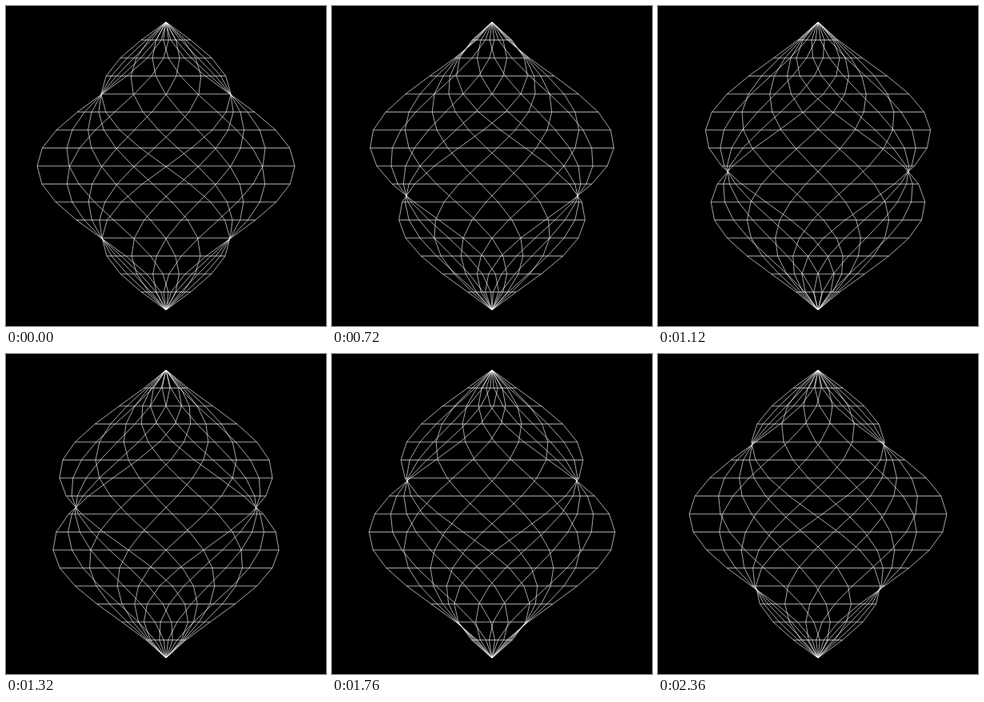
These frames come from a looping animation (400 px wide and 400 px high, 2400 ms). An HTML page with a canvas:

```html
<!DOCTYPE html>
<html lang="en">
<head>
<meta charset="utf-8">
<title>Twisting square lattice</title>
<style>
  html, body { margin: 0; height: 100%; overflow: hidden; background: #000; }
  canvas { display: block; }
</style>
</head>
<body>
<canvas id="stage" width="400" height="400"></canvas>
<script>
const ctx = document.getElementById('stage').getContext('2d');
const LOOP = 2400, STEP = 40, DELAY = 12;
const LEVELS = 16, SIDE = 4, RADIUS = 161, HEIGHT = 360, CENTER = 200;
const TWIST = Math.PI / LEVELS;

// Points along the perimeter of a square whose corners lie on the unit circle.
const perimeter = [];
for (let corner = 0; corner < 4; corner++) {
  const a = corner * Math.PI / 2, b = a + Math.PI / 2;
  for (let i = 0; i < SIDE; i++) {
    const f = i / SIDE;
    const x = Math.cos(a) * (1 - f) + Math.cos(b) * f;
    const z = Math.sin(a) * (1 - f) + Math.sin(b) * f;
    perimeter.push({ r: Math.hypot(x, z), angle: Math.atan2(z, x) });
  }
}

function polyline(points) {
  ctx.beginPath();
  for (const [x, y] of points) ctx.lineTo(x, y);
  ctx.stroke();
}

function draw(time) {
  const turn = (time - DELAY) / LOOP * Math.PI / 2;
  ctx.fillStyle = '#000';
  ctx.fillRect(0, 0, 400, 400);
  ctx.strokeStyle = '#fff';
  ctx.lineWidth = 0.65;
  ctx.lineJoin = 'bevel';

  const project = (p, k) => {
    const level = k - LEVELS / 2;
    return [
      CENTER + RADIUS * Math.cos(level * TWIST) * p.r *
        Math.cos(p.angle + level * TWIST + turn),
      CENTER + level / LEVELS * HEIGHT
    ];
  };

  for (const p of perimeter) {
    polyline(Array.from({ length: LEVELS + 1 }, (_, k) => project(p, k)));
  }
  for (let k = 1; k < LEVELS; k++) {
    const ring = perimeter.map(p => project(p, k));
    const xs = ring.map(([x]) => x), y = ring[0][1];
    polyline([[Math.min(...xs), y], [Math.max(...xs), y]]);
  }
}

function tick() {
  const time = performance.now() % LOOP;
  draw(Math.floor(time / STEP) * STEP);
  requestAnimationFrame(tick);
}
tick();
</script>
</body>
</html>
```
